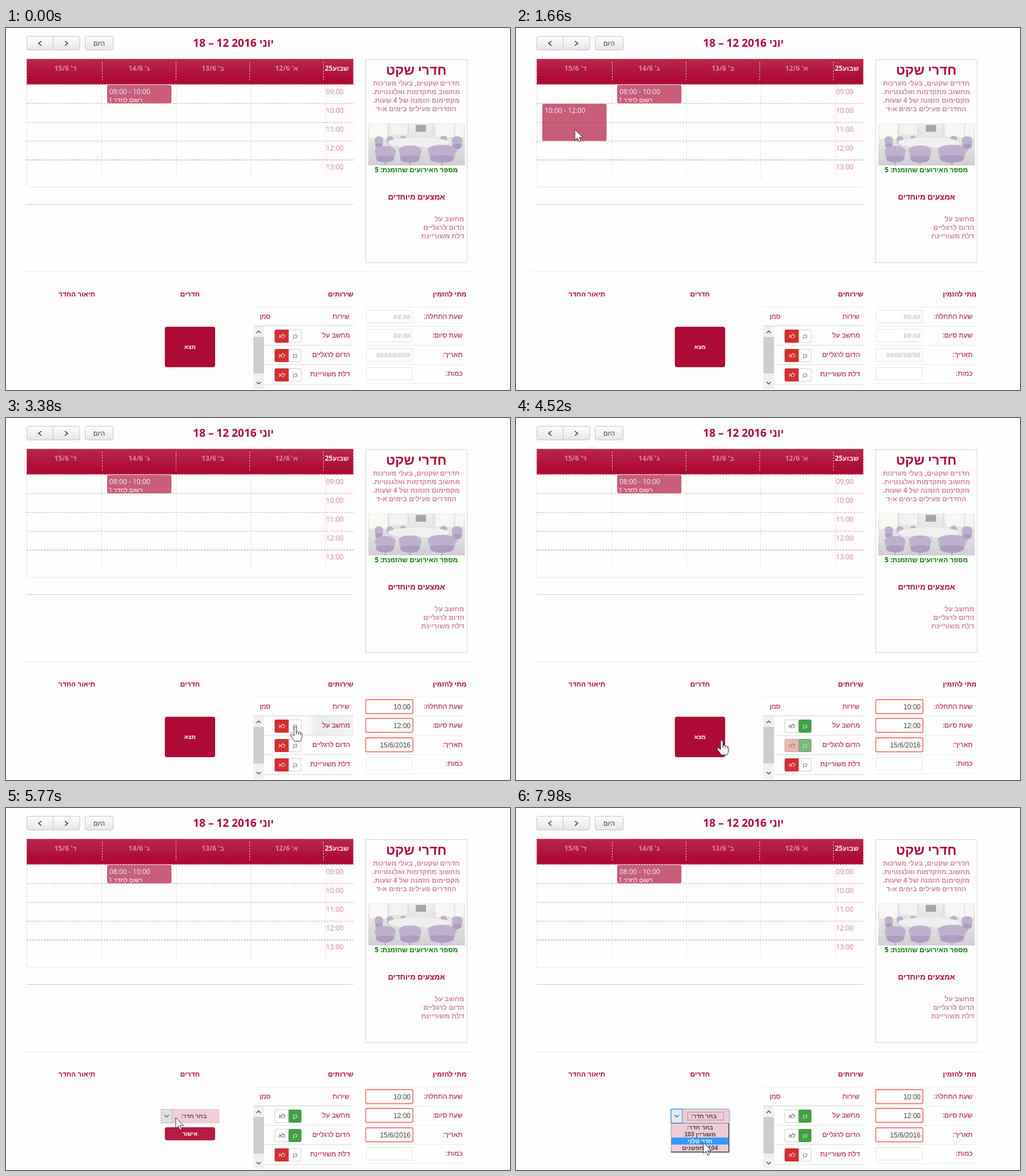
An HTML page for the animation above (8 s loop, 882 px wide and 635 px high).

```html
<!DOCTYPE html>
<html lang="he">
<head>
<meta charset="utf-8">
<title>חדרי שקט</title>
<style>
html, body { margin: 0; width: 100%; height: 100%; overflow: hidden; background: #fefefe; }
svg { display: block; font-family: "Open Sans", "Noto Sans", sans-serif; }
.field { font-family: "Liberation Sans", Arial, sans-serif; }
</style>
</head>
<body>
<svg width="882" height="635" viewBox="0 0 882 635">
  <defs>
    <linearGradient id="head" x2="0" y2="1"><stop stop-color="#ba274e"/><stop offset=".8" stop-color="#ad0a35"/></linearGradient>
    <linearGradient id="btn" x2="0" y2="1"><stop stop-color="#fff"/><stop offset="1" stop-color="#e6e6e6"/></linearGradient>
    <linearGradient id="hover"><stop stop-color="#fefefe"/><stop offset=".35" stop-color="#ededed"/><stop offset="1" stop-color="#f3f3f3"/></linearGradient>
    <linearGradient id="room" x2="0" y2="1"><stop stop-color="#eef0ec"/><stop offset=".45" stop-color="#e2e3e1"/><stop offset="1" stop-color="#d0ced3"/></linearGradient>
    <clipPath id="photo"><path d="M634 167h169v74h-169z"/></clipPath>
  </defs>
  <g id="page"></g>
  <g id="live"></g>
</svg>
<script>
const RED = '#ad0a35', PINK = '#d48399', LOOP = 8000;
const SERVICES = ['מחשב על', 'הדום לרגליים', 'דלת משוריינת'];
const $ = id => document.getElementById(id);

const text = (s, x, y, {size = 12, fill = RED, bold = 0, mid = 0, dir = 'rtl', cls = ''} = {}) =>
  `<text x="${x}" y="${y}" font-size="${size}" fill="${fill}" font-weight="${bold ? 700 : 400}" text-anchor="${mid ? 'middle' : 'start'}" direction="${dir}" class="${cls}">${s}</text>`;
const rect = (x, y, w, h, fill, more = '') =>
  `<rect x="${x}" y="${y}" width="${w}" height="${h}" fill="${fill}" ${more}/>`;
const line = (x1, y1, x2, y2, color, dash = '') =>
  `<path d="M${x1} ${y1}L${x2} ${y2}" stroke="${color}" stroke-dasharray="${dash}" fill="none"/>`;
const stroke = (d, color = '#333', w = 1.6) =>
  `<path d="${d}" stroke="${color}" stroke-width="${w}" fill="none"/>`;

const booking = (x, y, h, label) =>
  rect(x, y, 112.5, h, RED, 'opacity=".65" rx="3"') + text(label, x + 4, y + 15.5, {fill: '#e8f5ff', dir: 'ltr'});

function calendar() {
  const edge = 'stroke="#c4c4c4" rx="3"';
  let s = rect(36.5, 14.5, 92.5, 24, 'url(#btn)', edge) + line(82.5, 15, 82.5, 38, '#c4c4c4') +
    rect(138.5, 14.5, 49, 24, 'url(#btn)', edge) +
    stroke('M62 23l-5 4 5 4M103 23l5 4-5 4') +
    text('היום', 163, 31, {size: 11, fill: '#333', mid: 1}) +
    text('יוני 2016 12 – 18', 398, 33, {size: 19, bold: 1, mid: 1}) +
    rect(36, 54, 572, 45, 'url(#head)') +
    rect(36.5, 54.5, 571, 44, 'none', 'stroke="#d27f97" stroke-dasharray="3 2"') +
    text('שבוע25', 600, 75, {fill: '#fbeef1', bold: 1});
  ["א' 12/6", "ב' 13/6", "ג' 14/6", "ד' 15/6"].forEach((day, i) => {
    const x = 555.5 - i * 129;
    s += text(day, 491 - i * 129, 75, {fill: '#dc8ba2', bold: 1, mid: 1}) +
      line(x, 59, x, 94, '#eac3ce', '3 2');
  });
  for (let i = 0; i < 5; i++) {
    const x = Math.round(36 + i * 130.8) + .5, y = 99.5 + i * 33;
    s += line(x, 99, x, i ? 265 : 279, '#e2d9dc', '3 2') +
      line(36, y, 608, y, i == 4 ? '#a98c96' : '#dba5b4', '3 2') +
      text(`${String(9 + i).padStart(2, 0)}:00`, 560, 116 + i * 33, {fill: PINK, dir: 'ltr'});
  }
  return s + line(36, 279.5, 608, 279.5, '#e8e8e8') + line(36, 309.5, 608, 309.5, '#cbcbcb') +
    line(25, 427.5, 818, 427.5, '#eee') + booking(177, 100, 32, '08:00 - 10:00') +
    text('רשום לחדר 1', 239, 129.5, {size: 10.7, fill: '#fff'});
}

function chair(x, y, w, h) {
  const shell = `M0 .2Q.1 0 .5 0Q.95 0 1 .25L.9 .7Q.5 .9 .1 .7Z`, seat = 'M.08 .52Q.5 .4 .93 .52L.88 .7Q.5 .9 .1 .7Z';
  return `<g transform="translate(${x} ${y}) scale(${w} ${h})"><path d="M.47 .7h.06V1h-.06Z" fill="#b4b0ba"/>` +
    `<path d="${shell}" fill="#bfb1cd"/><path d="${seat}" fill="#ad9dc0"/></g>`;
}

function photo() {
  const blob = (x, y, rx, ry, c) => `<ellipse cx="${x}" cy="${y}" rx="${rx}" ry="${ry}" fill="${c}"/>`;
  const back = [[645, 190, 15, 26], [666, 190, 12, 18], [690, 189, 10, 14], [760, 189, 12, 18], [780, 190, 19, 28]];
  const front = [[645, 207, 37, 36], [687, 206, 40, 38], [738, 205, 50, 39]];
  const row = list => list.map(c => chair(...c)).join('');
  return '<g clip-path="url(#photo)">' + rect(634, 167, 169, 74, 'url(#room)') +
    rect(636, 168, 32, 26, '#f7f9f5') + rect(672, 170, 30, 17, '#f2f4f0') + rect(752, 168, 49, 23, '#f6f7f4') +
    stroke('M669 167v28M704 167v20M748 167v22M785 167v24', '#dadcd8', 1.5) +
    rect(717, 170, 18, 12, '#a5a6aa') + row(back) +
    blob(722, 201, 54, 9, '#f0f0f1') + rect(712, 208, 18, 16, '#dcdbe0') + row(front) + '</g>';
}

function panel() {
  const about = ['חדרים שקטים, בעלי מערכות', 'מחשוב מתקדמות ואלגנטיות.', 'מקסימום הזמנה של 4 שעות.', 'החדרים פעילים בימים א-ד'];
  return rect(629.5, 55.5, 177.5, 356, 'none', 'stroke="#d2d2d2"') +
    text('חדרי שקט', 718, 82, {size: 23.2, bold: 1, mid: 1}) +
    about.map((s, i) => text(s, 718, 100.5 + i * 15.2, {fill: PINK, bold: 1, mid: 1})).join('') + photo() +
    text('מספר האירועים שהזמנת: 5', 718, 253, {fill: '#077a07', bold: 1, mid: 1}) +
    text('אמצעים מיוחדים', 718.5, 301, {size: 13.3, bold: 1, mid: 1}) +
    SERVICES.map((s, i) => text(s, 802, 339 + i * 15.2, {fill: PINK, bold: 1})).join('');
}

function form() {
  let s = text('מתי להזמין', 806, 471, {bold: 1}) + text('שירותים', 608, 471, {bold: 1}) +
    text('חדרים', 322, 471, {bold: 1, mid: 1}) + text('תיאור החדר', 124, 471, {bold: 1, mid: 1}) +
    text('שירות', 601, 510) + text('סמן', 463, 510) +
    line(433, 489.5, 608, 489.5, '#eaeaea') + line(433, 522.5, 608, 522.5, '#d0d0d0') +
    rect(433, 523, 18.5, 110, '#f0f0f0') + rect(433, 542, 18.5, 64, '#cdcdcd') +
    stroke('M438.5 535l3.7-3.5 3.7 3.5M438.5 621l3.7 3.5 3.7-3.5', '#505050');
  ['שעת התחלה:', 'שעת סיום:', 'תאריך:', 'כמות:'].forEach((label, i) => {
    const y = 489.5 + Math.round(i * 33.5);
    s += text(label, 799, 510 + i * 33.4) + line(629, y, 806, y, '#ebebeb');
  });
  return s + line(629, 623.5, 806, 623.5, '#ebebeb');
}

function inputs(filled) {
  const values = filled ? ['10:00', '12:00', '15/6/2016', ''] : ['##:##', '##:##', '##/##/####', ''];
  return values.map((v, i) => {
    const y = 495.5 + Math.round(i * 33.4);
    const box = filled && i < 3
      ? rect(629.5, y - 1.5, 82.5, 24.5, '#fff', 'stroke="#f07f7b" stroke-width="1.8" rx="2"')
      : rect(630.5, y, 80.5, 22, '#fff', 'stroke="#e2e2e2" rx="1"');
    return box + text(v, 708, y + 15, {fill: filled ? '#444' : '#b4b4b4', cls: 'field'});
  }).join('');
}

// state: 0 = no, 1 = saving, 2 = yes
function toggle(y, state) {
  const left = ['#d22f2d', '#efb6b6', '#fff'][state], right = ['#fff', '#7bb87c', '#43a047'][state];
  return rect(470.5, y, 46, 22, '#fff', 'rx="2" stroke="#cfcfcf"') +
    rect(470.5, y, 24.5, 22, left, `rx="2" stroke="${['#cb3835', '#c9a9a9', '#cfcfcf'][state]}"`) +
    rect(495, y, 21.5, 22, right, `rx="2" stroke="${['#cfcfcf', '#76a077', '#439743'][state]}"`) +
    text('לא', 483, y + 14.5, {size: 10, fill: ['#fff', '#777', '#444'][state], mid: 1}) +
    text('כן', 506, y + 14.5, {size: 10, fill: ['#555', '#d8ecd8', '#fff'][state], mid: 1});
}

function services(t, hover) {
  const states = [t < 3640 ? 0 : t < 3900 ? 1 : 2, t < 4130 ? 0 : t < 4600 ? 1 : 2, 0];
  return SERVICES.map((s, i) => {
    const y = 523 + i * 34.3, bottom = Math.round(y + 33) + .5;
    return (hover == i ? rect(517, y, 91, 34, 'url(#hover)') : '') +
      line(452, bottom, 608, bottom, '#dcdcdc') +
      text(s, 602, 542.5 + i * 34) + toggle(529.5 + Math.round(i * 34.2), states[i]);
  }).join('');
}

const fade = (t, a, b) => Math.max(0, Math.min(1, (t - a) / (b - a)));
const button = (label, y, h, base) =>
  rect(278, y, 88, h, RED, 'rx="4"') + text(label, 322, base, {size: 10, fill: '#fff', bold: 1, mid: 1});

function rooms(t) {
  if (t < 5100) return `<g opacity="${1 - fade(t, 4650, 5100)}">${button('מצא', 524, 71, 563)}</g>`;
  const focus = t > 7150;
  return `<g opacity="${fade(t, 5420, 5800)}">` +
    (focus ? rect(271.5, 528.5, 101.5, 24, 'none', 'stroke="#cfe3f7" stroke-width="5" rx="3"') : '') +
    rect(271.5, 528.5, 101.5, 24, '#efccd5', `stroke="${focus ? '#8db8e2' : '#e3c3cc'}" rx="2"`) +
    rect(271.5, 528.5, 19.5, 24, focus ? '#dcedfb' : '#dedede', `stroke="${focus ? '#3c7fb1' : '#b0b0b0'}"`) +
    stroke('M277.5 538.5l3.7 3.7 3.7-3.7', '#444', 1.2) +
    (focus ? rect(300.5, 533.5, 63, 14, 'none', 'stroke="#c98396"') : '') +
    text('בחר חדר:', 351, 544, {size: 10.3, fill: '#444', bold: 1}) +
    button('אישור', 560, 23, 575) + '</g>' + (t > 7300 ? options(t) : '');
}

function options(t) {
  const picked = t < 7650 ? 0 : t < 7900 ? 1 : 2;
  let s = rect(271, 553, 102, 50, '#efccd5') + stroke('M271.5 553v50.5M271 553.5h101', '#b79aa3', 1) +
    stroke('M372.5 553v50.5H271', '#333', 1.5);
  ['בחר חדר:', 'משוריין 103', 'חדר טלני', '104 נחפשנים'].forEach((name, i) => {
    const on = i == picked;
    s += (on ? rect(272, 553.5 + i * 12.3, 100, 12.3, '#3399ff') : '') +
      text(name, 322, 563.5 + i * 12.3, {size: 10.5, fill: on ? '#fff' : '#444', bold: 1, mid: 1, cls: 'field'});
  });
  return s;
}

// time, x, y of the pointer
const PATH = [[70, 735, 634], [650, 66, 90], [830, 97, 138], [980, 102, 145], [1120, 103, 146], [1220, 103, 146],
  [1600, 103, 178], [1830, 103, 178], [2450, 577, 575], [2680, 577, 575], [3300, 506, 541], [3660, 506, 541],
  [3960, 506, 573], [4140, 506, 573], [4360, 404, 570], [4480, 360, 565], [5360, 360, 565], [5720, 297, 543],
  [5820, 297, 543], [6120, 310, 438], [6350, 326, 427], [6550, 332, 430], [6970, 298, 548], [7400, 298, 548],
  [7830, 323, 577], [7950, 328, 587], [8000, 328, 587]];

function pointer(t) {
  const i = PATH.findIndex(p => p[0] > t);
  if (i < 1) return null;
  const [a, x, y] = PATH[i - 1], [b, u, v] = PATH[i];
  const k = fade(t, a, b), e = k * k * (3 - 2 * k);
  return {x: x + (u - x) * e, y: y + (v - y) * e};
}

const inside = (p, x1, y1, x2, y2) => p.x > x1 && p.x < x2 && p.y > y1 && p.y < y2;

const solid = d => `<path d="${d}" fill="#fff" stroke="#333"/>`;
const BEAM = 'M-5-10Q0-10 0-7Q0-10 5-10M0-8V8M-5 10Q0 10 0 7Q0 10 5 10';
const CURSORS = {
  hand: solid('M-2 2Q0-1.5 2 2V10Q4.5 8 6 10.5Q8.5 9 9.5 11.5Q12 10.5 12 13.5V18Q11.5 22 9.5 26H-1Q-3 22-8 16Q-8.5 13-5.5 13.5L-2 17Z') +
    stroke('M2 10v4M6 11v4M9.5 12v3', '#333', 1),
  beam: stroke(BEAM, '#fff', 3.5) + stroke(BEAM, '#333', 1.3),
  arrow: solid('M0 0V19L4.5 15L7.5 22L10.5 20.5L7.5 14H14Z')
};

function cursor(p, t) {
  const hand = inside(p, 470, 528, 517, 620) || t < 4700 && inside(p, 278, 524, 366, 594);
  const kind = hand ? 'hand' : inside(p, 538, 523, 604, 625) ? 'beam' : 'arrow';
  return `<g transform="translate(${p.x} ${p.y})">${CURSORS[kind]}</g>`;
}

function frame(now) {
  const t = now % LOOP, p = pointer(t);
  const hover = p && inside(p, 452, 523, 608, 625) ? Math.floor((p.y - 523) / 34.3) : -1;
  const picking = t > 1220 && t < 2700, short = t < 1430;
  $('live').innerHTML =
    (picking ? booking(46, 133, short ? 32 : 65, short ? '10:00 - 11:00' : '10:00 - 12:00') : '') +
    inputs(t > 1900) + services(t, hover) + rooms(t) + (p ? cursor(p, t) : '');
  requestAnimationFrame(frame);
}

$('page').innerHTML = calendar() + panel() + form();
requestAnimationFrame(frame);
</script>
</body>
</html>
```
